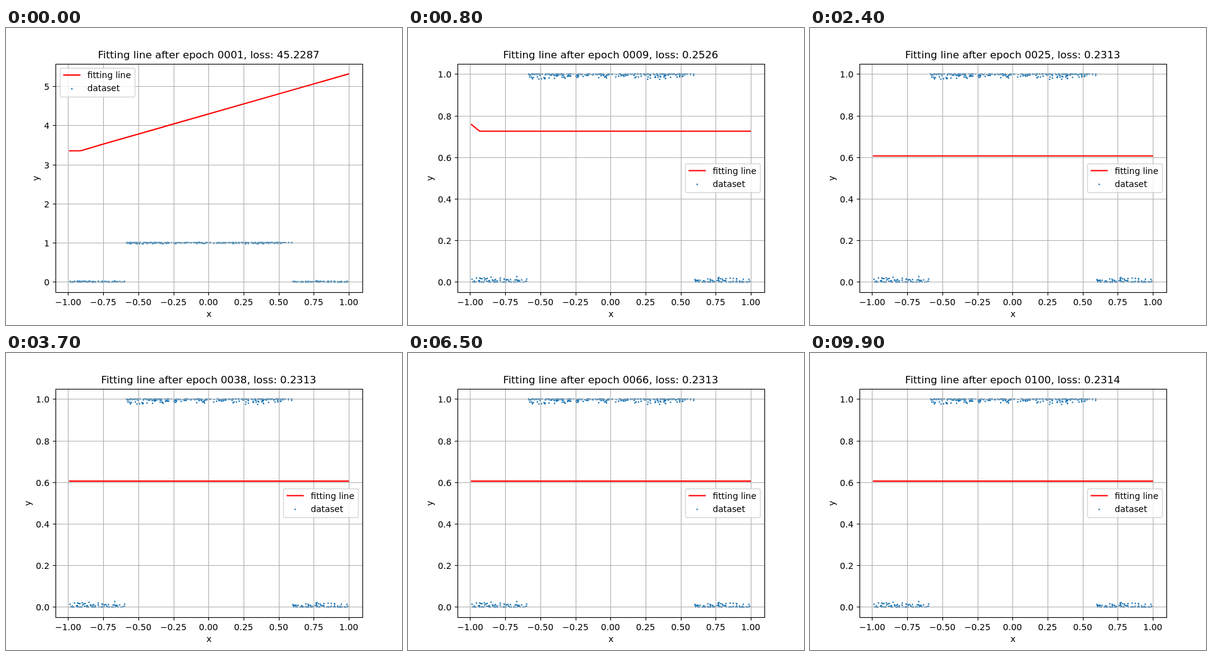
An HTML page for the animation above (10000 ms loop, 640 by 480 pixels).

```html
<!DOCTYPE html>
<html lang="en">
<head>
<meta charset="utf-8">
<title>Fitting line</title>
<style>
html, body { margin: 0; width: 100%; height: 100%; overflow: hidden; background: #fff; }
svg { display: block; width: 640px; height: 480px; }
text { font: 13.89px "DejaVu Sans", sans-serif; }
</style>
</head>
<body>
<svg id="stage" viewBox="0 0 640 480"></svg>
<script>
const LEFT = 80, RIGHT = 576, TOP = 57.6, BOTTOM = 427.2;
const ZERO_Y = 410.4, DATA_HEIGHT = 336;
const STEP_MS = 100, LOOP_MS = 10000;
const BLUE = '#1f77b4', GRID = '#b0b0b0';

const stage = document.getElementById('stage');

function add(parent, tag, attrs, text) {
  const node = document.createElementNS('http://www.w3.org/2000/svg', tag);
  for (const key in attrs) node.setAttribute(key, attrs[key]);
  if (text !== undefined) node.textContent = text;
  parent.append(node);
  return node;
}

const snap = v => Math.floor(v + 0.5) + 0.5;
const px = x => 327.2 + 226.8 * x;

function seeded(seed) {
  return () => (seed = (seed * 16807) % 2147483647) / 2147483647;
}

// A box function with clipped Gaussian noise.
const random = seeded(2024);
const dataset = Array.from({ length: 500 }, () => {
  const x = -0.99 + 1.985 * random();
  const gauss = Math.sqrt(-2 * Math.log(random())) * Math.cos(2 * Math.PI * random());
  const noise = Math.max(0, gauss) * 0.01;
  return Math.abs(x) < 0.597 ? [x, 1 - noise] : [x, noise];
});

// Corners of the fitted line and the loss during the first epochs.
const early = [
  { loss: 45.2287, line: [[-0.99, 3.35], [-0.915, 3.35], [-0.895, 3.365], [-0.775, 3.495], [0.997, 5.31]] },
  { loss: 14.6318, line: [[-0.99, 2.2], [-0.8, 2.2], [0.997, 3.62]] },
  { loss: 3.8746, line: [[-0.99, 1.43], [-0.68, 1.43], [0.997, 2.48]] },
  { loss: 0.9502, line: [[-0.99, 0.944], [-0.547, 0.944], [0.997, 1.75]] },
  { loss: 0.6127, line: [[-0.99, 0.86], [-0.42, 0.86], [0.997, 1.36]] },
  { loss: 0.4218, line: [[-0.99, 0.81], [-0.2, 0.81], [0.997, 1.08]] },
  { loss: 0.3265, line: [[-0.99, 0.78], [0.2, 0.78], [0.997, 0.88]] },
  { loss: 0.2764, line: [[-0.99, 0.765], [-0.95, 0.75], [0.997, 0.75]] },
  { loss: 0.2526, line: [[-0.99, 0.757], [-0.945, 0.732], [-0.93, 0.725], [0.997, 0.725]] }
];

function fitAt(epoch) {
  if (epoch <= early.length) return early[epoch - 1];
  const age = epoch - early.length;
  const level = 0.605 + 0.12 * Math.exp(-age / 3.5);
  const rise = 0.032 * Math.exp(-age / 1.5);
  const loss = epoch < 73 ? 0.2313 + 0.0213 * Math.exp(-age / 1.75) : 0.2314;
  return { loss, line: [[-0.99, level + rise], [-0.94, level], [0.997, level]] };
}

function tickStep(top) {
  const rough = top * 1.1 / 9;
  return [0.1, 0.2, 0.25, 0.5, 1].find(step => step >= rough);
}

const decimals = step => step === 0.25 ? 2 : step < 1 ? 1 : 0;

const black = { stroke: '#000', 'stroke-width': 1.11, fill: 'none' };
const gridStyle = { stroke: GRID, 'stroke-width': 1.11, fill: 'none' };
const dotStyle = { stroke: BLUE, 'stroke-width': 2.5, 'stroke-linecap': 'round', fill: 'none' };
const redStyle = { stroke: '#f00', 'stroke-width': 2.08, 'stroke-linecap': 'square', 'stroke-linejoin': 'round', fill: 'none' };

const dots = add(stage, 'path', dotStyle);
const gridX = add(stage, 'path', gridStyle);
const gridY = add(stage, 'path', gridStyle);
const ticksX = add(stage, 'path', black);
const ticksY = add(stage, 'path', black);
const fitted = add(stage, 'path', redStyle);
add(stage, 'rect', { x: snap(LEFT), y: snap(TOP), width: RIGHT - LEFT, height: snap(BOTTOM) - snap(TOP), ...black });

let gridXPath = '', ticksXPath = '';
for (let i = -4; i <= 4; i++) {
  const x = snap(px(i / 4));
  gridXPath += `M${x} ${TOP}V${BOTTOM}`;
  ticksXPath += `M${x} ${snap(BOTTOM)}v4.86`;
  const label = (i < 0 ? '\u2212' : '') + Math.abs(i / 4).toFixed(2);
  add(stage, 'text', { x: px(i / 4), y: 448, 'text-anchor': 'middle' }, label);
}
gridX.setAttribute('d', gridXPath);
ticksX.setAttribute('d', ticksXPath);

const title = add(stage, 'text', { x: 327.6, y: 49, 'text-anchor': 'middle', style: 'font-size:16.67px' });
add(stage, 'text', { x: 328, y: 467, 'text-anchor': 'middle' }, 'x');
const labelY = add(stage, 'text', { 'text-anchor': 'middle' }, 'y');
const labelsY = add(stage, 'g', { 'text-anchor': 'end' });

const legend = add(stage, 'g', {});
add(legend, 'rect', { x: 87.5, y: 65, width: 121, height: 46.5, rx: 2.8, fill: '#fff', 'fill-opacity': 0.8, stroke: '#ccc', 'stroke-opacity': 0.8, 'stroke-width': 1.39 });
add(legend, 'path', { d: 'M93.5 76H119.3', ...redStyle });
add(legend, 'path', { d: 'M106.4 98.3h0', ...dotStyle });
add(legend, 'text', { x: 131.4, y: 81 }, 'fitting line');
add(legend, 'text', { x: 131.4, y: 102 }, 'dataset');

function draw(epoch) {
  const { loss, line } = fitAt(epoch);
  const top = Math.max(1, ...line.map(point => point[1]));
  const py = y => ZERO_Y - y / top * DATA_HEIGHT;
  const place = ([x, y]) => `${px(x).toFixed(2)} ${py(y).toFixed(2)}`;

  title.textContent = `Fitting line after epoch ${String(epoch).padStart(4, '0')}, loss: ${loss.toFixed(4)}`;
  dots.setAttribute('d', dataset.map(point => `M${place(point)}h0`).join(''));
  fitted.setAttribute('d', 'M' + line.map(place).join('L'));

  const step = tickStep(top), digits = decimals(step);
  let gridPath = '', tickPath = '';
  labelsY.replaceChildren();
  for (let i = 0; py(i * step) > TOP; i++) {
    const y = snap(py(i * step));
    gridPath += `M${LEFT} ${y}H${RIGHT}`;
    tickPath += `M${snap(LEFT)} ${y}h-4.86`;
    add(labelsY, 'text', { x: 70.3, y: y + 5 }, (i * step).toFixed(digits));
  }
  gridY.setAttribute('d', gridPath);
  ticksY.setAttribute('d', tickPath);

  const labelWidth = 8.84 * (1 + digits) + (digits ? 4.41 : 0);
  labelY.setAttribute('transform', `translate(${(61.7 - labelWidth).toFixed(1)} 243) rotate(-90)`);
  legend.setAttribute('transform', top < 1.15 ? 'translate(361 154.5)' : 'translate(0 0)');
}

let shown = 0;
const start = performance.now();

function tick(now) {
  const elapsed = Math.max(0, now - start) % LOOP_MS;
  const epoch = Math.floor(elapsed / STEP_MS) + 1;
  if (epoch !== shown) draw(shown = epoch);
  requestAnimationFrame(tick);
}

tick(start);
</script>
</body>
</html>
```
